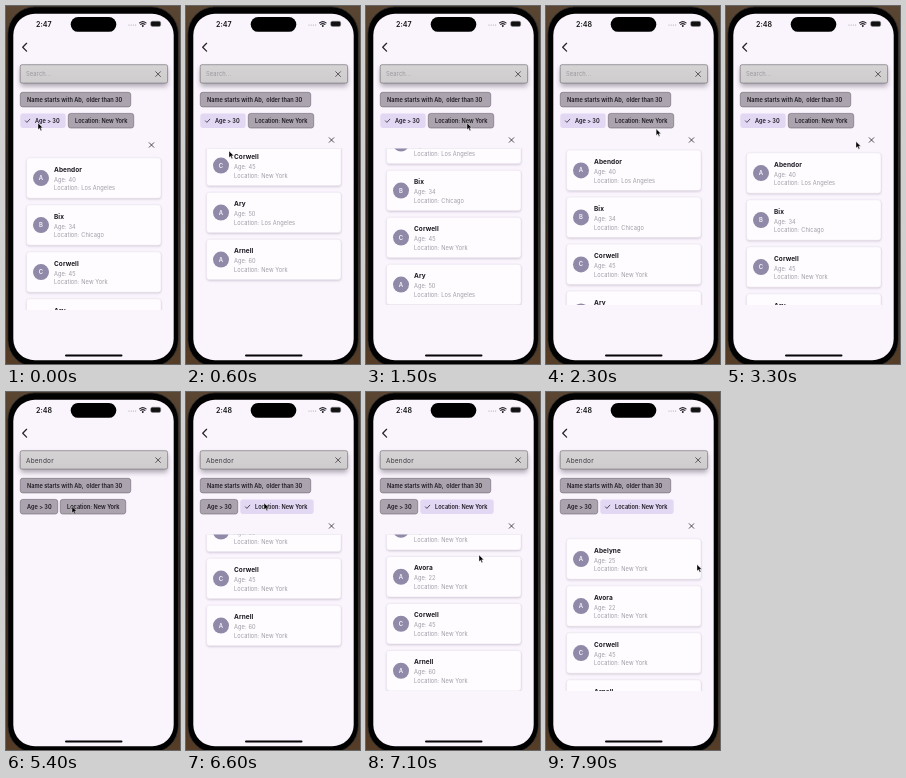
Write an HTML page that moves like this. It is 174 by 358 pixels and loops after 8 s.

```html
<!DOCTYPE html>
<html lang="en">
<head>
<meta charset="utf-8">
<title>Search filters</title>
<style>
html, body { margin: 0; width: 100%; height: 100%; overflow: hidden; background: #2c211a; }
svg { display: block; width: 100vw; height: 100vh; font-family: Inter, Roboto, sans-serif; }
text { white-space: pre; }
.line { fill: none; stroke: #28242c; stroke-linecap: round; stroke-linejoin: round; }
</style>
</head>
<body>
<svg viewBox="0 0 174 358">
  <defs>
    <linearGradient id="wood" x1="0" y1="0" x2="0" y2="1">
      <stop offset="0" stop-color="#5a4632"/><stop offset=".5" stop-color="#2a201a"/><stop offset="1" stop-color="#563d27"/>
    </linearGradient>
    <linearGradient id="field" x1="0" y1="0" x2="0" y2="1">
      <stop offset="0" stop-color="#d5d3d4"/><stop offset="1" stop-color="#cecccd"/>
    </linearGradient>
    <filter id="soft" x="-10%" y="-30%" width="120%" height="170%"><feGaussianBlur stdDeviation="1"/></filter>
    <filter id="deep" x="-10%" y="-70%" width="120%" height="240%"><feGaussianBlur stdDeviation="2.4"/></filter>
    <clipPath id="view"><rect x="18" y="142.5" width="140" height="156.5"/></clipPath>
  </defs>
  <rect width="174" height="358" fill="url(#wood)"/>
  <rect x="1.8" y=".8" width="170.6" height="360" rx="27" fill="#020203" stroke="#3a3634" stroke-width=".8"/>
  <rect x="7.3" y="7.8" width="160.4" height="346.4" rx="21.5" fill="#faf4fd"/>
  <rect x="64.7" y="11" width="45.6" height="14.8" rx="7.4" fill="#000"/>
  <rect x="59" y="348.4" width="57.5" height="2" rx="1" fill="#050505"/>
  <g id="chrome"></g>
  <g id="chips"></g>
  <g id="panel">
    <path class="line" d="M143.2 131.7l4.6 4.6m0-4.6l-4.6 4.6" stroke-width=".8"/>
    <g clip-path="url(#view)"><g id="older"></g><g id="local"></g></g>
  </g>
  <path id="cursor" d="M0 0V6.6L1.6 5.2 2.7 7.7 3.8 7.2 2.7 4.8H4.8Z" fill="#000" stroke="#fff" stroke-width=".4" stroke-linejoin="round"/>
</svg>
<script>
const LOOP = 8000, STEP = 100, PITCH = 47;
const $ = id => document.getElementById(id);

function set(el, attrs) {
  for (const k in attrs) el.setAttribute(k, attrs[k]);
}
function add(parent, tag, attrs, label) {
  const el = document.createElementNS("http://www.w3.org/2000/svg", tag);
  set(el, attrs);
  if (label !== undefined) el.textContent = label;
  return parent.appendChild(el);
}
function write(parent, x, y, size, weight, fill, label, spacing = 0) {
  return add(parent, "text", { x, y, "font-size": size, "font-weight": weight, fill, "letter-spacing": spacing }, label);
}
const show = (el, on) => set(el, { visibility: on ? "inherit" : "hidden" });
const move = (el, x, y) => set(el, { transform: `translate(${x} ${y})` });

// Status bar and search field
const chrome = $("chrome");
const clock = write(chrome, 30, 20.6, 7.1, 600, "#111", "2:47");
for (let i = 0; i < 4; i++) add(chrome, "circle", { cx: 123 + i * 2.2, cy: 19, r: 0.6, fill: "#aaa4ad" });
add(chrome, "path", { d: "M133.6 16.9q3.2-2.7 6.4 0M134.7 18.4q2.1-1.7 4.2 0", class: "line", "stroke-width": 1.2 });
add(chrome, "circle", { cx: 136.8, cy: 20, r: 0.9, fill: "#111" });
add(chrome, "rect", { x: 144.7, y: 15.2, width: 10, height: 5.2, rx: 1.6, fill: "#111", stroke: "#8d8891", "stroke-width": 0.5 });
add(chrome, "path", { d: "M20.6 37.3l-3.9 3.9 3.9 3.9", class: "line", "stroke-width": 1.25 });
add(chrome, "rect", { x: 14.5, y: 62, width: 147, height: 18.4, rx: 2, fill: "#6f6975", opacity: 0.55, filter: "url(#deep)" });
add(chrome, "rect", { x: 14.2, y: 58.7, width: 147.4, height: 18.4, rx: 1.8, fill: "url(#field)", stroke: "#6a666c", "stroke-width": 0.6 });
add(chrome, "path", { d: "M149.7 65.7l4.8 4.8m0-4.8l-4.8 4.8", class: "line", "stroke-width": 0.7 });
const hint = write(chrome, 20, 70.3, 5.8, 400, "#9b969d", "Search...", 0.1);
const query = write(chrome, 20, 70.6, 6.5, 400, "#3d3843", "Abendor", 0.2);

// Filter chips: the returned function places one and sets how far it is selected
function makeChip(label, y, width) {
  const g = add($("chips"), "g", {});
  const box = add(g, "rect", { x: 0.3, y, height: 14.6, rx: 2.4, stroke: "#6b6471", "stroke-width": 0.6 });
  const tick = add(g, "path", { d: `M5.5 ${y + 7.5}l1.4 1.5 2.9-3.2`, class: "line", "stroke-width": 0.8 });
  const text = write(g, 7, y + 9.4, 5.6, 600, "#1d1921", label);
  return (x, p) => {
    const mix = (a, b) => Math.round(a + (b - a) * p);
    move(g, x, 0);
    set(box, {
      width: width - 0.6 + 8 * p,
      fill: `rgb(${mix(171, 226)},${mix(164, 216)},${mix(174, 243)})`,
      "stroke-opacity": 1 - p
    });
    set(tick, { opacity: p });
    set(text, { x: 7 + 8 * p });
  };
}
makeChip("Name starts with Ab,  older than 30", 86.3, 111)(14, 0);
const ageChip = makeChip("Age > 30", 107.4, 38);
const placeChip = makeChip("Location: New York", 107.4, 66);

// Result cards
const NY = "New York", LA = "Los Angeles";
const people = [
  { name: "Abendor", age: 40, city: LA },
  { name: "Abelyne", age: 25, city: NY },
  { name: "Bix", age: 34, city: "Chicago" },
  { name: "Avora", age: 22, city: NY },
  { name: "Corwell", age: 45, city: NY },
  { name: "Ary", age: 50, city: LA },
  { name: "Arnell", age: 60, city: NY }
];
function fillList(list, matches) {
  people.filter(matches).forEach(({ name, age, city }, i) => {
    const g = add(list, "g", {});
    move(g, 20.5, 146.8 + i * PITCH);
    add(g, "rect", { x: 0.2, y: 1, width: 134.4, height: 40.4, rx: 3, fill: "#8d8496", opacity: 0.4, filter: "url(#soft)" });
    add(g, "rect", { width: 134.5, height: 40.4, rx: 3, fill: "#fefcff", stroke: "#e2dce7", "stroke-width": 0.4 });
    add(g, "circle", { cx: 14.5, cy: 20.3, r: 8, fill: "#9089a8" });
    set(write(g, 14.5, 22.4, 5.9, 600, "#f8f4fc", name[0]), { "text-anchor": "middle" });
    write(g, 27.5, 14, 6.5, 700, "#1c1820", name, 0.06);
    write(g, 27.5, 23.8, 5.67, 400, "#a09aa4", "Age: " + age, 0.1);
    write(g, 27.5, 32.6, 5.67, 400, "#a09aa4", "Location: " + city, 0.1);
  });
}
fillList($("older"), p => p.age > 30);
fillList($("local"), p => p.city === NY);

// Motion
const ramp = (t, from, to) => Math.min(1, Math.max(0, (t - from) / (to - from)));
const ease = (t, from, to) => {
  const p = ramp(t, from, to);
  return p * p * (3 - 2 * p);
};
const olderScroll = t => 101.5 * ease(t, 200, 600) - 23.5 * ease(t, 600, 950)
  - 48.5 * ease(t, 1000, 1500) - 29.5 * ease(t, 1650, 2450);
const localScroll = t => 74.5 * (ease(t, 6100, 6600) - ease(t, 6700, 7400));

const home = { x: 32, y: 117 };
const glides = [
  { from: 100, to: 600, x: 43, y: 145 },
  { from: 900, to: 1500, x: 101, y: 117 },
  { from: 1700, to: 3300, x: 130, y: 135.5 },
  { from: 3300, to: 3700, x: 90, y: 160 },
  { from: 3800, to: 4700, x: 32, y: 113 },
  { from: 4900, to: 5400, x: 66, y: 114.5 },
  { from: 5700, to: 6600, x: 78, y: 111 },
  { from: 6700, to: 7500, x: 148, y: 215 },
  { from: 7600, to: 7900, x: 151, y: 172.5 }
];
function pointer(t) {
  return glides.reduce((p, g) => {
    const k = ease(t, g.from, g.to);
    return { x: p.x + (g.x - p.x) * k, y: p.y + (g.y - p.y) * k };
  }, home);
}

function draw(t) {
  const picked = t >= 3800, refined = t >= 5800;
  clock.textContent = t < 2000 ? "2:47" : "2:48";
  show(hint, !picked);
  show(query, picked);

  const age = 1 - ramp(t, 4700, 4900);
  ageChip(14, age);
  placeChip(54 + 8 * age, ramp(t, 5500, 5800));

  const settle = refined ? ramp(t, 5900, 6100) : ramp(t, 0, 200);
  show($("panel"), !picked || refined);
  show($("older"), !picked);
  show($("local"), refined);
  move($("panel"), 0, 5 * (1 - settle));
  move($("older"), 0, -olderScroll(t));
  move($("local"), 0, -localScroll(t));

  const { x, y } = pointer(t);
  move($("cursor"), x, y);
}

const start = performance.now();
function tick() {
  const t = (performance.now() - start) % LOOP;
  draw(Math.floor(t / STEP) * STEP);
  requestAnimationFrame(tick);
}
tick();
</script>
</body>
</html>
```
